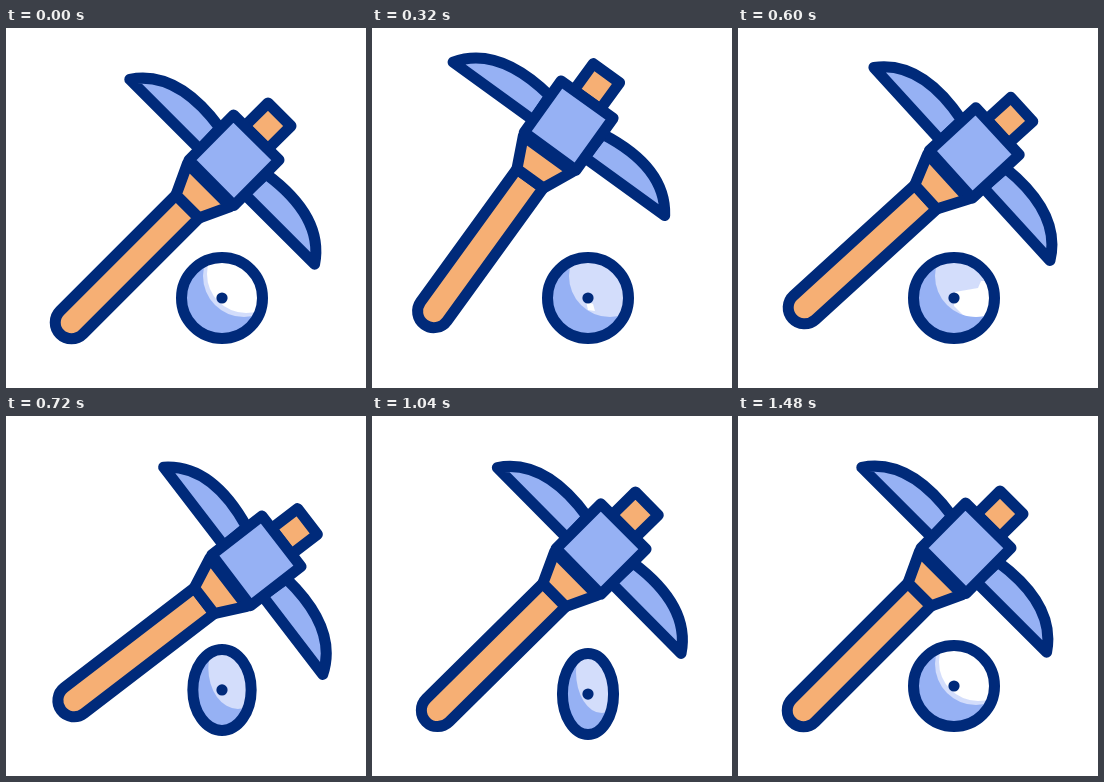
Write an HTML page that moves like this. It is 360x360 px and loops after 1520 ms.

```html
<!DOCTYPE html>
<html lang="en">
<head>
<meta charset="utf-8">
<title>Pickaxe and coin</title>
<style>
  html, body { margin: 0; height: 100%; overflow: hidden; background: #fff; }
  svg { display: block; width: 100vw; height: 100vh; }
  .line { stroke: #002a7a; stroke-width: 11; stroke-linejoin: round; stroke-linecap: round; }
  .steel { fill: #96b1f4; }
  .wood { fill: #f6af74; }
  .shine { fill: #d3ddfb; }
  .glare { fill: #fff; }
</style>
</head>
<body>
<svg viewBox="0 0 360 360">
  <defs>
    <clipPath id="disc"><circle r="37"/></clipPath>
    <clipPath id="lit"><circle cx="22" cy="-22" r="41"/></clipPath>
    <path id="blade" d="M123.8 51.4C149 46.5 180 54 214 100L194 121.6Z"/>
  </defs>
  <g id="pick" class="line">
    <use href="#blade" class="steel"/>
    <use href="#blade" class="steel" transform="matrix(0 -1 -1 0 360 360)"/>
    <path class="wood" d="M170 167L54 283A16.2 16.2 0 0 0 77 306L193 190Z"/>
    <path class="wood" d="M181.5 135.5L170 167L193 190L224.5 178.5Z"/>
    <path class="wood" d="M238.7 98.2L262 75L285 98L261.7 121.2Z"/>
    <path class="steel" d="M227.5 87L273 132L228 177.5L183 132Z"/>
  </g>
  <g id="coin">
    <g id="face">
      <circle r="40" class="steel"/>
      <g clip-path="url(#disc)">
        <circle class="shine" cx="22" cy="-22" r="41"/>
        <g clip-path="url(#lit)"><path id="glare" class="glare"/></g>
      </g>
    </g>
    <ellipse id="rim" ry="40.5" class="line" fill="none"/>
    <circle r="5.6" fill="#002a7a"/>
  </g>
</svg>
<script>
  const LOOP = 1520, STEP = 40;
  const $ = id => document.getElementById(id);
  const pick = $('pick'), coin = $('coin'), face = $('face'), rim = $('rim'), glare = $('glare');

  // Tables of [time, value], eased between neighbours.
  const swing = [[0, 0], [330, -9.1], [410, -9.1], [706, 7.5], [800, 7.5], [1075, 0]];
  const lift = [[60, 0], [580, -16], [1080, 0]];
  const squash = [[600, 1], [840, .44], [1350, 1]];

  const full = 'M-15 -24a39 39 0 1 0 78 0a39 39 0 1 0 -78 0Z';
  const glares = [
    [0, full],
    [120, 'M1 4L10 -3L16 5L15 12L5 13Z'],
    [320, 'M-2 3L5 6L7 13L0 12Z'],
    [520, 'M1 -6L24 -10L27 -17H40V24L12 20L0 8Z'],
    [640, ''],
    [1360, full]
  ];

  function at(keys, t) {
    const i = keys.findIndex(k => k[0] > t);
    if (i === 0) return keys[0][1];
    if (i < 0) return keys[keys.length - 1][1];
    const [t0, a] = keys[i - 1], [t1, b] = keys[i];
    const u = (t - t0) / (t1 - t0);
    return a + (b - a) * u * u * (3 - 2 * u);
  }

  function draw(t) {
    pick.setAttribute('transform',
      `translate(0 ${at(lift, t)}) rotate(${at(swing, t)} 44 316)`);
    const drop = t > 600 && t < 1360 ? 8.3 * Math.sin(Math.PI * (t - 600) / 760) : 0;
    const width = at(squash, t);
    coin.setAttribute('transform', `translate(216 ${270 + drop})`);
    face.setAttribute('transform', `scale(${width} 1)`);
    rim.setAttribute('rx', 40.5 * width);
    glare.setAttribute('d', glares.filter(g => g[0] <= t).pop()[1]);
  }

  const start = performance.now();
  function tick() {
    const t = Math.max(0, performance.now() - start) % LOOP;
    draw(Math.floor(t / STEP) * STEP);
    requestAnimationFrame(tick);
  }
  tick();
</script>
</body>
</html>
```
